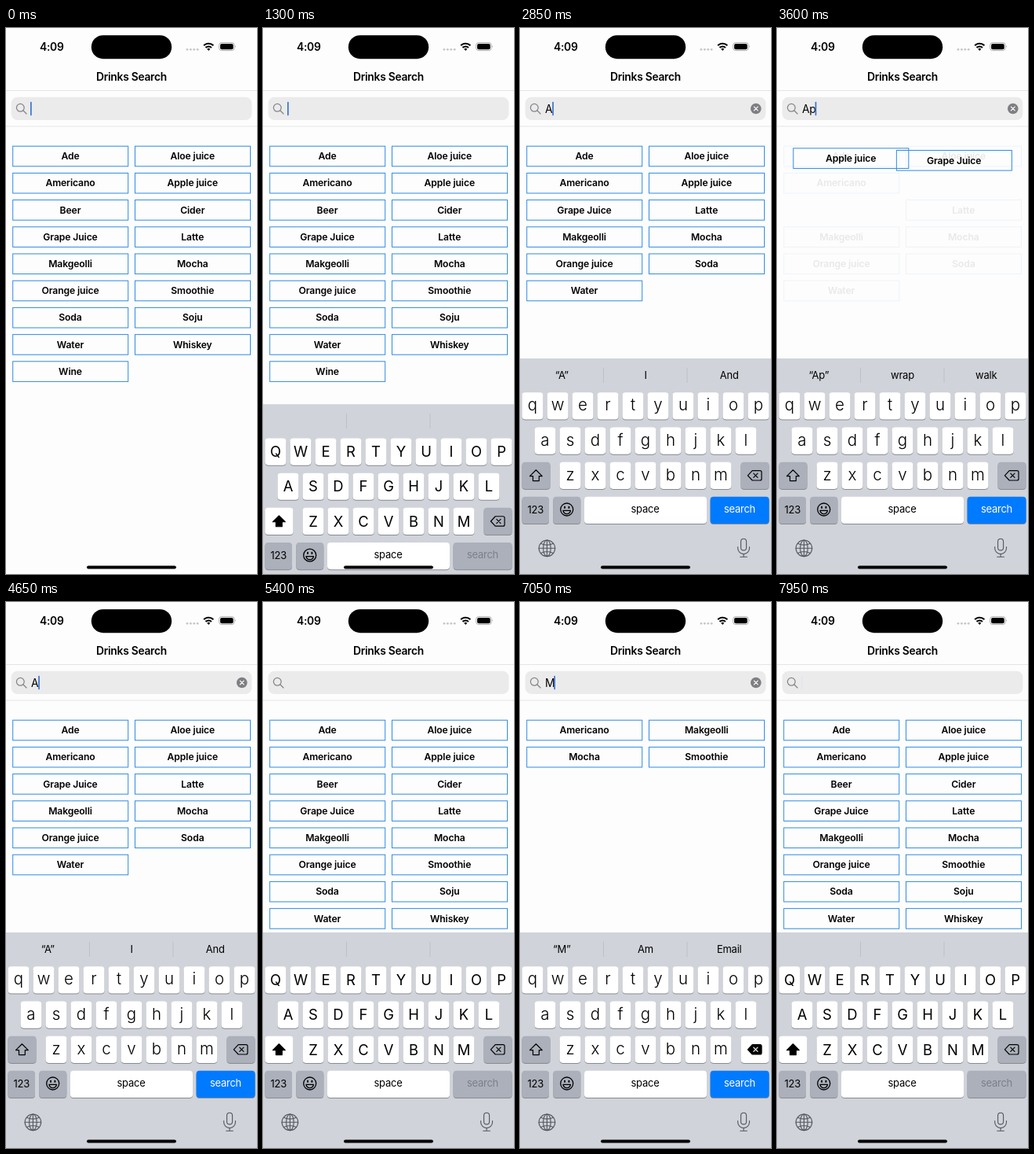
An HTML page for the animation above (8 s loop, 320 px wide and 694 px high).

```html
<!DOCTYPE html>
<html lang="en">
<head>
<meta charset="utf-8">
<title>Drinks Search</title>
<style>
  html, body { margin: 0; width: 100%; height: 100%; overflow: hidden; background: #fdfdfd; }
  svg { display: block; width: 320px; height: 694px; }
  text { font-family: Inter, Roboto, sans-serif; font-size: 13px; letter-spacing: -.02em; text-anchor: middle; fill: #000; }
  .title { font-size: 13.84px; font-weight: 600; }
  .query { font-size: 13.84px; text-anchor: start; }
  .cell text { font-size: 12.2px; font-weight: 600; letter-spacing: -.01em; }
  .cell rect { fill: none; stroke: #2f8be6; stroke-width: 1; }
  .upper text { font-size: 18.4px; letter-spacing: 0; }
  .lower text { font-size: 20.5px; font-weight: 300; letter-spacing: 0; }
  .big { font-size: 29px; letter-spacing: 0; }
  .line { fill: none; stroke: #000; stroke-linecap: round; stroke-linejoin: round; }
</style>
</head>
<body>
<svg viewBox="0 0 320 694">
  <rect width="320" height="694" fill="#fdfdfd"/>
  <text class="title" x="58.3" y="28.8">4:09</text>
  <rect x="108.8" y="9.2" width="102.4" height="30" rx="15"/>
  <g fill="#c6c6c8">
    <circle cx="231" cy="27.3" r="1.4"/><circle cx="235.4" cy="27.3" r="1.4"/>
    <circle cx="239.8" cy="27.3" r="1.4"/><circle cx="244.2" cy="27.3" r="1.4"/>
  </g>
  <g fill="none" stroke="#000" stroke-width="2">
    <path d="M252.2 22.3a8.4 8.4 0 0 1 12.2 0M254.6 25a5.2 5.2 0 0 1 7.4 0"/>
    <path d="M258.3 29l-2-2.2a2.9 2.9 0 0 1 4 0z" fill="#000" stroke="none"/>
  </g>
  <rect x="271.7" y="18.6" width="19.4" height="10" rx="3.2" fill="none" stroke="#a5a5a7" stroke-width=".9"/>
  <rect x="273.1" y="20" width="16.6" height="7.2" rx="2"/>
  <path d="M292.3 22.1q1.5 1.5 0 3z" fill="#a5a5a7"/>
  <text class="title" x="160" y="66.8">Drinks Search</text>
  <path d="M0 79.5H320M0 125H320" stroke="#e2e2e3" stroke-width=".9"/>

  <rect x="6.6" y="87.7" width="306.8" height="29.4" rx="8.2" fill="#ebebec"/>
  <g class="line" style="stroke:#858589;stroke-width:1.25">
    <circle cx="18.3" cy="101.3" r="4.9"/><path d="M22 105L26 109"/>
  </g>
  <text class="query" id="query" x="32" y="107.7"></text>
  <rect id="caret" y="93.8" width="1.7" height="17.6" rx=".8" fill="#3874d0"/>
  <g id="clear">
    <circle cx="300.8" cy="102.5" r="6.8" fill="#7f7f83"/>
    <path class="line" style="stroke:#fff;stroke-width:1.2" d="M298.4 100.1l4.8 4.8m0-4.8l-4.8 4.8"/>
  </g>

  <g id="cells"></g>
  <g id="board"></g>
  <rect x="103" y="683.4" width="114" height="4.2" rx="2.1"/>
</svg>

<script>
const LOOP = 8000;
const NAMES = ['Ade', 'Aloe juice', 'Americano', 'Apple juice', 'Beer', 'Cider', 'Grape Juice',
  'Latte', 'Makgeolli', 'Mocha', 'Orange juice', 'Smoothie', 'Soda', 'Soju', 'Water', 'Whiskey', 'Wine'];
const ROWS = ['qwertyuiop', 'asdfghjkl', 'zxcvbnm'];
const ROW_X = [16, 32, 64], ROW_Y = [463.3, 507.5, 551.7, 595.8];
const KEY_H = 34.2, KB_H = 274;
const GREY = '#abb0ba', BLUE = '#007aff';

// Each input restarts the caret blink: [time, query]
const INPUTS = [[-400, ''], [1150, ''], [2490, 'A'], [3355, 'Ap'], [4300, 'A'],
  [4740, ''], [6150, 'M'], [6890, 'M'], [7100, '']];
const HINTS = { '': ['', '', ''], A: ['“A”', 'I', 'And'], Ap: ['“Ap”', 'wrap', 'walk'], M: ['“M”', 'Am', 'Email'] };
const CARET_X = { '': 31, A: 41.2, Ap: 48.6, M: 43.3 };
// [from, to, key]
const TAPS = [[2320, 2490, 'A'], [3210, 3350, 'p'], [5980, 6150, 'M']];
const DELETES = [[4240, 4360], [4690, 4800], [6890, 7120]];

const $ = id => document.getElementById(id);
const clamp = (v, a = 0, b = 1) => Math.min(b, Math.max(a, v));
const smooth = v => { v = clamp(v); return v * v * (3 - 2 * v); };
const ease = v => (1 - Math.cos(Math.PI * clamp(v))) / 2;
const show = (id, on) => { $(id).style.display = on ? '' : 'none'; };
const during = (t, spans) => spans.find(([a, b]) => t >= a && t < b);

const key = (x, y, w, fill = '#fff', id = '') =>
  `<rect x="${x}" y="${y + 1}" width="${w}" height="${KEY_H}" rx="4.1" fill="#898b90"/>
   <rect id="${id}" x="${x}" y="${y}" width="${w}" height="${KEY_H}" rx="4.1" fill="${fill}"/>`;
const eachKey = fn => ROWS.map((row, r) =>
  [...row].map((c, i) => fn(c, ROW_X[r] + 32 * i, ROW_Y[r])).join('')).join('');

function buildBoard() {
  const [, , y3, y4] = ROW_Y;
  $('board').innerHTML = `
    <rect y="420" width="320" height="${KB_H + 4}" fill="#d0d3d9"/>
    <path d="M106.5 432V451M213 432V451" stroke="#bbbec4" stroke-width=".9"/>
    ${[53.3, 160, 266.7].map((x, i) => `<text id="hint${i}" x="${x}" y="445.8"></text>`).join('')}
    ${eachKey((c, x, y) => key(x - 13.5, y, 27))}
    <g id="upper" class="upper">${eachKey((c, x, y) => `<text x="${x}" y="${y + 23.8}">${c.toUpperCase()}</text>`)}</g>
    <g id="lower" class="lower">${eachKey((c, x, y) => `<text x="${x}" y="${y + 23}">${c}</text>`)}</g>
    ${key(2.5, y3, 36, GREY, 'shift')}
    <path id="arrow" class="line" stroke-width="1.2" d="M20.4 561.8L28.3 569.6H24.3V575.6H16.5V569.6H12.5z"/>
    ${key(281.5, y3, 36, GREY, 'del')}
    <path id="delShape" class="line" stroke-width="1.2" d="M296.2 562.6H306Q308 562.6 308 564.6V573Q308 575 306 575H296.2L290.4 568.8z"/>
    <path id="delCross" class="line" stroke-width="1.2" d="M297.8 566.2l5.2 5.2m0-5.2l-5.2 5.2"/>
    ${key(2.5, y4, 34.5, GREY)}<text x="19.7" y="${y4 + 21}">123</text>
    ${key(42.3, y4, 35, GREY)}
    <g class="line" stroke-width="1.3"><circle cx="59.7" cy="612" r="8"/>
      <path d="M54.9 613.4H64.5Q63.5 617.6 59.7 617.6T54.9 613.4z"/>
      <path stroke-width="1.9" d="M57 608.6v1.3M62.4 608.6v1.3"/></g>
    ${key(82, y4, 156, '#fff')}<text x="159.5" y="${y4 + 20.3}">space</text>
    ${key(242.6, y4, 75, GREY, 'go')}<text id="goText" x="280" y="${y4 + 20.3}">search</text>
    <g class="line" style="stroke:#53565c;stroke-width:1.1">
      <circle cx="34.4" cy="661.3" r="10.3"/><ellipse cx="34.4" cy="661.3" rx="4.8" ry="10.3"/>
      <path d="M34.4 651V671.6M24.1 661.3H44.7M26.7 655.2Q34.4 659 42.1 655.2M26.7 667.4Q34.4 663.6 42.1 667.4"/>
      <rect x="281.6" y="649.3" width="7" height="14.6" rx="3.5"/>
      <path d="M277.7 659.6V661.2a7.4 7.4 0 0 0 14.8 0V659.6M285.1 668.6V672.2M280.8 672.2H289.4"/>
    </g>
    <g id="popup"><path id="bubble" fill="#fff" style="filter:drop-shadow(0 1px 1.5px rgba(0,0,0,.35))"/>
      <text id="bubbleText" class="big"></text></g>`;
}

function drawPopup(c) {
  const r = ROWS.findIndex(row => row.includes(c.toLowerCase()));
  const cx = ROW_X[r] + 32 * ROWS[r].indexOf(c.toLowerCase());
  const top = ROW_Y[r] - 52.3, base = ROW_Y[r] + KEY_H;
  const x = clamp(cx - 24, 2, 270), a = cx - 13.5, b = cx + 13.5;
  $('bubble').setAttribute('d', `M${x + 8} ${top}h32q8 0 8 8v26
    C${x + 48} ${top + 46} ${b} ${top + 44} ${b} ${top + 56}V${base - 4}q0 4 -4 4H${a + 4}q-4 0 -4 -4V${top + 56}
    C${a} ${top + 44} ${x} ${top + 46} ${x} ${top + 34}V${top + 8}q0 -8 8 -8z`);
  $('bubbleText').textContent = c;
  $('bubbleText').setAttribute('x', x + 24);
  $('bubbleText').setAttribute('y', top + 33.8);
}

buildBoard();
$('cells').innerHTML = NAMES.map(n =>
  `<g class="cell"><rect x=".5" y=".5" width="147" height="25.6"/><text x="73.8" y="17.6">${n}</text></g>`).join('');
const cells = [...$('cells').children];

const matches = q => NAMES.filter(n => n.toLowerCase().includes(q.toLowerCase()));
const slot = i => [8.2 + 155.8 * (i % 2), 149.7 + 34.2 * Math.floor(i / 2)];

function drawCells(from, to, k) {
  const before = matches(from), after = matches(to);
  NAMES.forEach((name, n) => {
    const i = before.indexOf(name), j = after.indexOf(name);
    const p = slot(i < 0 ? j : i), q = slot(j < 0 ? i : j);
    const [x, y] = p.map((v, d) => v + (q[d] - v) * k);
    cells[n].setAttribute('transform', `translate(${x} ${y})`);
    cells[n].setAttribute('opacity', (i < 0 ? 0 : 1 - k) + (j < 0 ? 0 : k));
  });
}

function caretAlpha(age) {
  const u = age < 480 ? 0 : (age - 480) % 1000;
  return 1 - smooth(u / 180) + smooth((u - 350) / 180);
}

function frame() {
  const t = performance.now() % LOOP;
  let n = 0;
  while (n + 1 < INPUTS.length && INPUTS[n + 1][0] <= t) n++;
  const [at, query] = INPUTS[n];
  const last = n ? INPUTS[n - 1][1] : '';
  const age = t - at, typed = query !== '';

  drawCells(last, query, ease(age / 300));
  $('query').textContent = query;
  $('caret').setAttribute('x', CARET_X[query]);
  $('caret').setAttribute('opacity', caretAlpha(age));
  show('clear', typed);

  // critically damped spring
  const s = Math.max(0, t - 1100) * .0145;
  $('board').setAttribute('transform', `translate(0 ${KB_H * (1 + s) * Math.exp(-s)})`);
  show('board', t >= 1100);
  show('upper', !typed);
  show('lower', typed);
  $('shift').setAttribute('fill', typed ? GREY : '#fff');
  $('arrow').style.fill = typed ? 'none' : '#000';
  $('go').setAttribute('fill', typed ? BLUE : GREY);
  $('goText').style.fill = typed ? '#fff' : '#7b8088';

  const held = during(t, DELETES);
  $('del').setAttribute('fill', held ? '#fff' : GREY);
  $('delShape').style.fill = held ? '#000' : 'none';
  $('delCross').style.stroke = held ? '#fff' : '#000';

  HINTS[query].forEach((word, i) => {
    $('hint' + i).textContent = word;
    $('hint' + i).setAttribute('opacity', last === query ? 1 : clamp(age / 240));
  });

  const tap = during(t, TAPS);
  show('popup', tap);
  if (tap) drawPopup(tap[2]);
  requestAnimationFrame(frame);
}
frame();
</script>
</body>
</html>
```
